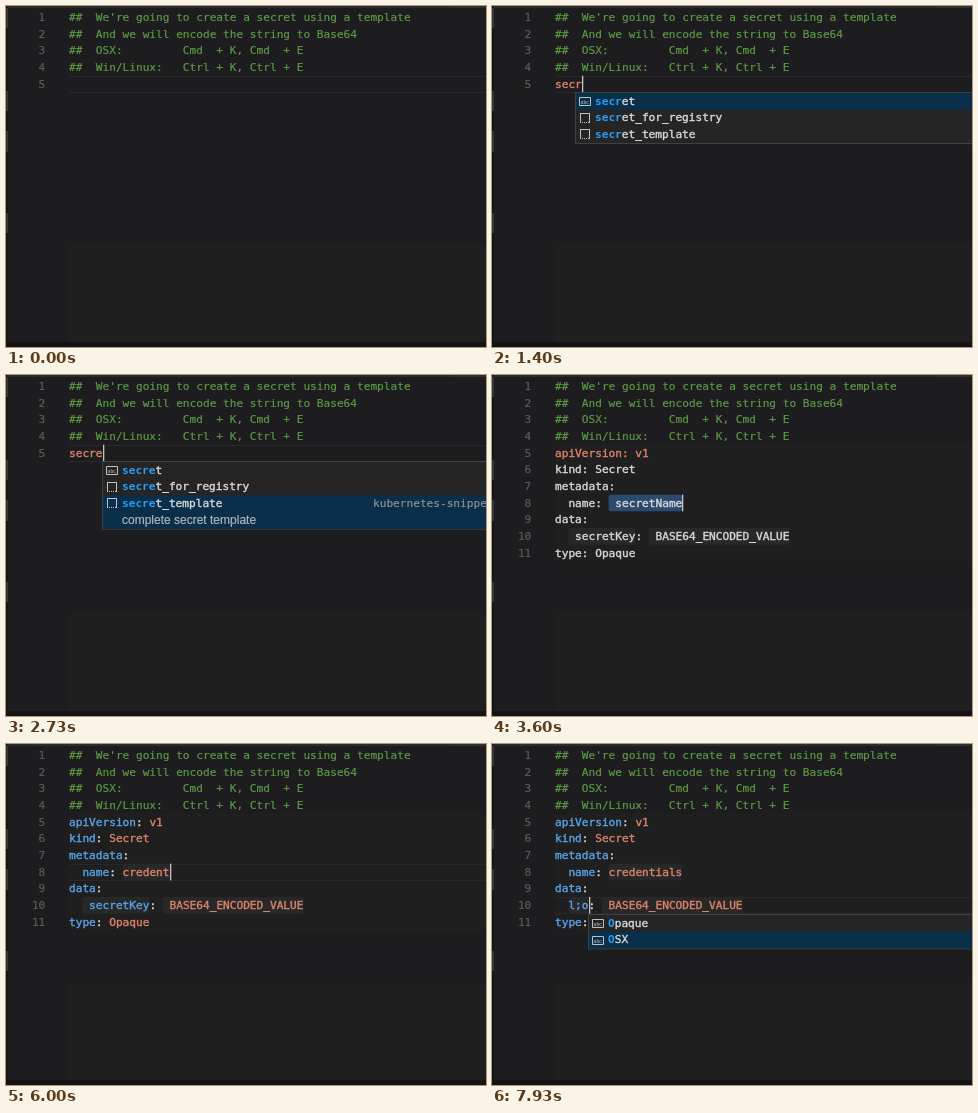
Recreate the animation shown at these times as an HTML page with a canvas. Size 480 by 341 pixels, loop 8000 ms.

```html
<!DOCTYPE html>
<html lang="en">
<head>
<meta charset="utf-8">
<title>Editor snippet</title>
<style>
html, body { margin: 0; width: 100%; height: 100%; overflow: hidden; background: #1d1c1e; }
canvas { display: block; }
</style>
</head>
<body>
<canvas></canvas>
<script>
const W = 480, H = 341, LOOP = 8000;
const LEFT = 63, CH = 6.7, ROW = 16.67;
const MONO = '11.13px "DejaVu Sans Mono", monospace';
const SANS = '12px "Liberation Sans", sans-serif';
const GREEN = '#5b9a45', RED = '#d9836c', BLUE = '#5aa2e6', PLAIN = '#d8d8d8';
const DIM = '#8f9194', MATCH = '#2a9df4', SELECTED = '#0a2f4b';
const FIELD = '#282828', SELECTION = '#2c4a6e';
const POPUP_DELAY = 130;

const canvas = document.querySelector('canvas');
const ctx = canvas.getContext('2d');
const ratio = window.devicePixelRatio || 1;
canvas.width = W * ratio;
canvas.height = H * ratio;
canvas.style.width = W + 'px';
canvas.style.height = H + 'px';
ctx.scale(ratio, ratio);
ctx.lineJoin = 'round';

const comments = [
  "##  We're going to create a secret using a template",
  '##  And we will encode the string to Base64',
  '##  OSX:         Cmd  + K, Cmd  + E',
  '##  Win/Linux:   Ctrl + K, Ctrl + E'
];
const word = label => ({ label });
const snippet = (label, about) => ({ label, about });
const registry = snippet('secret_for_registry', 'complete secret to connect to private registry');
const template = snippet('secret_template', 'complete secret template');
const secretItems = [word('secret'), registry, template];
const shortItems = [word('secret'), word('string'), registry, template, word('service'), word('using')];

// Key presses: time at which each letter appears
const secreKeys = [870, 1070, 1200, 1330, 1600];
const nameKeys = Array.from('credentials', (_, i) => 5130 + i * 133);
const dataKeys = [7670, 7800, 7870];
const blinkStarts = [-770, ...secreKeys, 3270, ...nameKeys, 7600, ...dataKeys];

const typed = (text, keys, t) => text.slice(0, keys.filter(k => k <= t).length);
const colX = col => LEFT + col * CH;
const rowY = row => 3 + row * ROW;

function rect(x, y, w, h, color) {
  ctx.fillStyle = color;
  ctx.fillRect(x, y, w, h);
}

// A thin outline thickens the glyphs a little
function text(str, x, y, color, font = MONO, weight = 0.4) {
  ctx.font = font;
  ctx.fillStyle = ctx.strokeStyle = color;
  ctx.fillText(str, x, y);
  if (!weight) return;
  ctx.lineWidth = weight;
  ctx.strokeText(str, x, y);
}

function cells(row, col, count, color) {
  ctx.fillStyle = color;
  ctx.beginPath();
  ctx.roundRect(colX(col), rowY(row), count * CH, ROW, 2.5);
  ctx.fill();
}

function code(row, col, str, color, weight) {
  text(str, colX(col), rowY(row) + 12, color, MONO, weight);
}

function activeLine(row) {
  const y = Math.round(rowY(row));
  rect(LEFT, y, W, 1, FIELD);
  rect(LEFT, y + 16, W, 1, FIELD);
}

function cursor(row, col, t) {
  const start = blinkStarts.filter(s => s <= t).pop();
  if ((t - start) % 1000 < 500) rect(Math.round(colX(col)), rowY(row), 1.3, ROW, '#c4c4c4');
}

function icon(item, x, y) {
  const color = '#c0c0c0';
  if (item.about) {
    rect(x + 1, y + 3, 10, 1, color);
    rect(x + 1, y + 3, 1, 10, color);
    rect(x + 10, y + 3, 1, 10, color);
    for (let i = 1; i < 10; i += 2) rect(x + i, y + 12, 1, 1, color);
  } else {
    ctx.strokeStyle = color;
    ctx.lineWidth = 1;
    ctx.strokeRect(x + 0.5, y + 4.5, 11, 8);
    text('abc', x + 1.6, y + 10.5, color, '5px "Liberation Sans", sans-serif', 0);
  }
}

function popup(row, col, items, selected, prefix) {
  const x = Math.floor(colX(col));
  const detailed = items[selected].about ? 1 : 0;
  let y = Math.round(rowY(row + 1)) + 1;
  const height = (items.length + detailed) * ROW + 1;
  rect(x, y - 1, W, height + 1, '#414141');
  rect(x + 1, y, W, height - 1, '#252526');
  items.forEach((item, i) => {
    const open = i === selected;
    const h = open ? ROW * (1 + detailed) : ROW;
    if (open) rect(x + 1, y, W, h, SELECTED);
    icon(item, x + 4, Math.round(y));
    // Only a leading match is highlighted
    const split = item.label.toLowerCase().startsWith(prefix) ? prefix.length : 0;
    text(item.label.slice(0, split), x + 20, y + 11.7, MATCH, 'bold ' + MONO, 0);
    text(item.label.slice(split), x + 20 + split * CH, y + 11.7, PLAIN);
    if (open && detailed) {
      text('kubernetes-snippets', 367, y + 11.7, DIM, MONO, 0.2);
      text(item.about, x + 20, y + 28.6, '#aeb4ba', SANS, 0.2);
    }
    y += h;
  });
}

function frame() {
  rect(0, 0, W, H, '#1d1c1e');
  rect(LEFT, 239, W, 97, '#1f1f1f');
  rect(0, 0, 445, 2, '#2c2c2c');
  rect(445, 0, 35, 2, '#303030');
  rect(0, 0, 1.5, H, '#141414');
  for (const [y, h] of [[2, 20], [85, 20], [125, 21], [207, 20]]) rect(0, y, 2, h, '#363636');
  rect(0, 336, W, 5, '#171314');
}

function secretLine(t) {
  const str = typed('secre', secreKeys, t);
  const anchor = typed('secre', secreKeys, t - POPUP_DELAY).length;
  activeLine(4);
  code(4, 0, str, RED);
  cursor(4, str.length, t);
  if (!anchor) return;
  const items = str.length < 2 ? shortItems : secretItems;
  const selected = t < 1870 ? 0 : t < 2730 ? 1 : 2;
  popup(4, anchor, items, selected, str);
}

function pair(row, col, key, gap, value, colored) {
  const end = col + key.length;
  code(row, col, key, colored ? BLUE : PLAIN);
  code(row, end, ':', PLAIN);
  code(row, end + 1 + gap, value, colored ? RED : PLAIN);
}

function manifest(t) {
  const colored = t >= 3870;
  const naming = t >= nameKeys[0];
  const name = naming ? typed('credentials', nameKeys, t) : ' secretName';
  const onData = t >= 7600;
  const editing = t >= dataKeys[0];
  const key = editing ? typed('l;o', dataKeys, t) : ' secretKey';
  const nameEnd = 8 + name.length, keyEnd = 2 + key.length;

  rect(LEFT, rowY(4), W, ROW * 7, '#1f1f1f');
  if (editing) activeLine(9);
  else if (naming && !onData) activeLine(7);
  cells(7, 8, name.length, naming ? FIELD : SELECTION);
  cells(9, 2, key.length, onData && !editing ? SELECTION : FIELD);
  cells(9, keyEnd + 2, 21, FIELD);

  if (colored) pair(4, 0, 'apiVersion', 1, 'v1', true);
  else code(4, 0, 'apiVersion: v1', RED);
  pair(5, 0, 'kind', 1, 'Secret', colored);
  pair(6, 0, 'metadata', 0, '', colored);
  pair(7, 2, 'name', 1, name, colored);
  pair(8, 0, 'data', 0, '', colored);
  pair(9, 2, key, 1, ' BASE64_ENCODED_VALUE', colored);
  pair(10, 0, 'type', 1, 'Opaque', colored);

  if (onData) cursor(9, keyEnd, t);
  else cursor(7, nameEnd, t);
  if (t >= dataKeys[2]) popup(9, keyEnd, [word('Opaque'), word('OSX')], t < 7930 ? 0 : 1, 'o');
}

function draw(now) {
  const t = now % LOOP;
  const inserted = t >= 3270;
  frame();
  if (inserted) manifest(t);
  else secretLine(t);
  comments.forEach((line, i) => code(i, 0, line, GREEN, 0.2));
  const lines = inserted ? 11 : 5;
  for (let i = 1; i <= lines; i++) {
    text(String(i), 39.3 - String(i).length * CH, rowY(i - 1) + 12, '#5c5c5c', MONO, 0.2);
  }
  requestAnimationFrame(draw);
}
requestAnimationFrame(draw);
</script>
</body>
</html>
```
